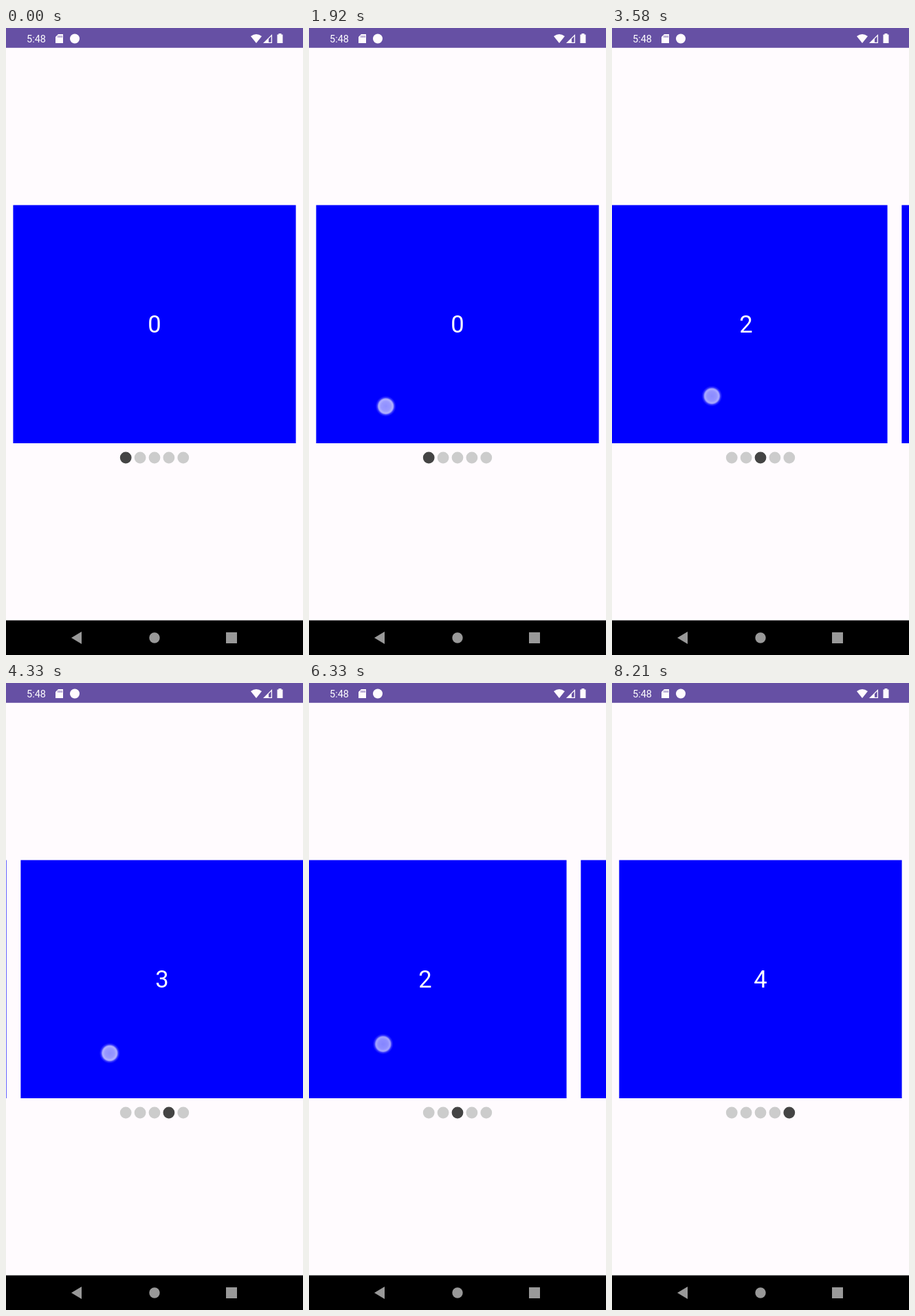
These frames come from a looping animation (432x912 px, 8.25 s). An HTML page with a canvas:

```html
<!DOCTYPE html>
<html lang="en">
<head>
<meta charset="utf-8">
<title>Pager with indicator</title>
<style>
  html, body { margin: 0; width: 100%; height: 100%; overflow: hidden; background: #fffbfe; }
  canvas { display: block; }
</style>
</head>
<body>
<canvas id="stage" width="432" height="912"></canvas>
<script>
const ctx = document.getElementById('stage').getContext('2d');
const W = 432, H = 912, LOOP = 8250, PAGES = 5;
const SLOP = 9, SPRING = 0.02, DRAG_CURVE = 1.5;
const PAPER = '#fffbfe', BLUE = '#0000ff', PURPLE = '#6650a4', NAV = '#999';

// A swipe: start time, finger start, horizontal travel and drag duration.
const swipes = [
  { at: 1898, x: 118, y: 549, travel: -105, drag: 150 },
  { at: 2844, x: 196, y: 526, travel: -150, drag: 150 },
  { at: 3530, x: 175, y: 530, travel: -150, drag: 150 },
  { at: 4295, x: 131, y: 542, travel: 260, drag: 200 },
  { at: 5101, x: 150, y: 539, travel: 260, drag: 200 },
  { at: 5775, x: 175, y: 520, travel: -150, drag: 150 },
  { at: 6253, x: 164, y: 515, travel: -150, drag: 150 },
  { at: 7150, x: 165, y: 520, travel: -150, drag: 150 }
];

// Scroll distance in pixels that one swipe has added at the given age.
function swipeScroll({ travel, drag }, age) {
  if (age <= 0) return 0;
  const dir = -Math.sign(travel), reach = Math.abs(travel);
  if (age < drag) {
    return dir * Math.max(0, reach * (age / drag) ** DRAG_CURVE - SLOP);
  }
  const t = age - drag;
  if (t > 600) return dir * W;
  const rest = W - (reach - SLOP);
  const speed = DRAG_CURVE * reach / drag;
  return dir * (W - (rest + (SPRING * rest - speed) * t) * Math.exp(-SPRING * t));
}

function shape(points, color) {
  ctx.fillStyle = color;
  ctx.beginPath();
  points.forEach(([x, y]) => ctx.lineTo(x, y));
  ctx.closePath();
  ctx.fill();
}

function rect(x, y, w, h, color) {
  ctx.fillStyle = color;
  ctx.fillRect(x, y, w, h);
}

function disc(x, y, r, color) {
  ctx.fillStyle = color;
  ctx.beginPath();
  ctx.arc(x, y, r, 0, Math.PI * 2);
  ctx.fill();
}

function text(label, x, y, size, align) {
  ctx.font = `${size}px Roboto, sans-serif`;
  ctx.textAlign = align;
  ctx.fillStyle = '#fff';
  ctx.fillText(label, x, y);
}

function drawStatusBar() {
  rect(0, 0, W, 28.8, PURPLE);
  text('5:48', 30, 20.5, 14.5, 'left');

  shape([[76, 9], [83, 9], [83, 22], [72, 22], [72, 13]], PAPER);
  [75.5, 78, 80.5].forEach(x => rect(x, 11, 1, 3, PURPLE));
  disc(100, 15.5, 7, PAPER);

  ctx.fillStyle = PAPER;
  ctx.beginPath();
  ctx.moveTo(364, 22);
  ctx.lineTo(356, 12);
  ctx.quadraticCurveTo(364, 6, 372, 12);
  ctx.fill();

  ctx.strokeStyle = PAPER;
  ctx.lineWidth = 1.3;
  ctx.beginPath();
  ctx.moveTo(375.5, 21.4);
  ctx.lineTo(386.4, 10.5);
  ctx.lineTo(386.4, 21.4);
  ctx.closePath();
  ctx.stroke();
  shape([[375, 22], [382, 15], [382, 22]], PAPER);

  rect(396.5, 8, 4, 2, PAPER);
  rect(394.5, 9.5, 8, 12.5, PAPER);
}

function drawNavBar() {
  rect(0, 861.6, W, 50.4, '#000');
  shape([[95, 887], [110, 878], [110, 896]], NAV);
  disc(216, 887, 7.7, NAV);
  rect(320, 879, 16, 16, NAV);
}

// Cards land on whole pixels while they scroll.
function drawPages(scroll) {
  for (let i = 0; i < PAGES; i++) {
    const left = Math.round(i * W - scroll);
    if (Math.abs(left) >= W) continue;
    rect(left + 10.4, 257.6, 411.2, 346.4, BLUE);
    text(i, left + W / 2, 442.6, 34.5, 'center');
  }
}

function drawIndicator(current) {
  for (let i = 0; i < PAGES; i++) {
    disc(216 + (i - 2) * 20.9, 625, 8.4, i === current ? '#444' : '#ccc');
  }
}

function drawTouch(swipe, age) {
  if (age < 0 || age > swipe.drag) return;
  const progress = age / swipe.drag;
  const dx = swipe.travel * progress ** DRAG_CURVE;
  const x = swipe.x + dx, y = swipe.y - 0.18 * dx;
  const glow = ctx.createRadialGradient(x, y, 0, x, y, 15);
  const stops = [[0, 0.58], [0.45, 0.62], [0.68, 0.72], [0.76, 0.5], [0.84, 0.2], [1, 0]];
  stops.forEach(([at, alpha]) => glow.addColorStop(at, `rgba(255,255,255,${alpha})`));
  ctx.globalAlpha = 1 - 0.2 * progress;
  disc(x, y, 15, glow);
  ctx.globalAlpha = 1;
}

function draw(time) {
  const scroll = swipes.reduce((sum, s) => sum + swipeScroll(s, time - s.at), 0);
  rect(0, 0, W, H, PAPER);
  drawPages(scroll);
  drawIndicator(Math.round(scroll / W));
  swipes.forEach(s => drawTouch(s, time - s.at));
  drawStatusBar();
  drawNavBar();
}

const began = performance.now();
function tick() {
  draw((performance.now() - began) % LOOP);
  requestAnimationFrame(tick);
}
tick();
</script>
</body>
</html>
```
